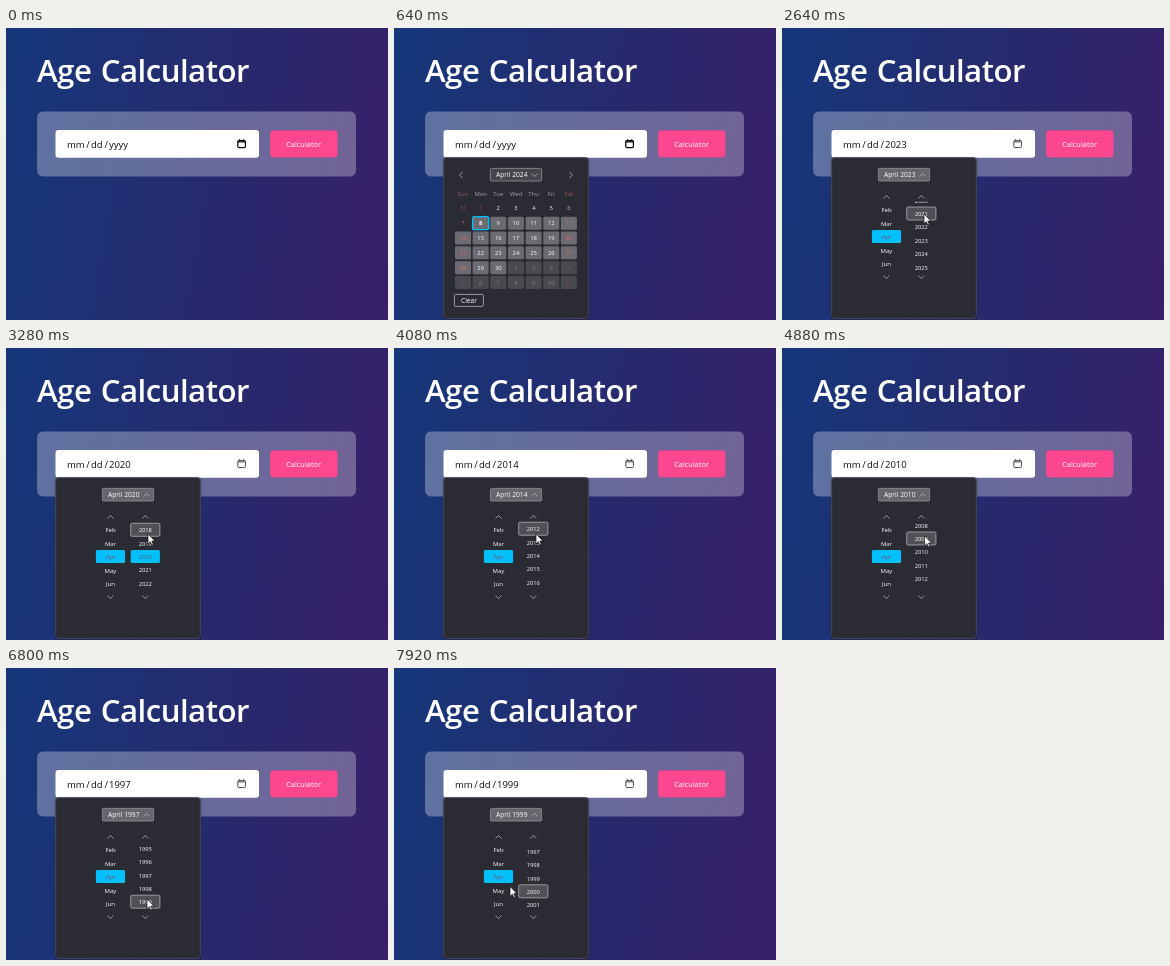
An HTML page that plays this animation: 382x292 px, repeating every 8000 ms.

```html
<!DOCTYPE html>
<html lang="en">
<head>
<meta charset="utf-8">
<title>Age Calculator</title>
<style>
  html, body { margin: 0; width: 100%; height: 100%; overflow: hidden; }
  body { background: linear-gradient(100deg, #15387b, #272a6e 52%, #381f67); }
  svg { display: block; width: 100vw; height: 100vh; }
  text { font-family: "Open Sans", "Noto Sans", sans-serif; white-space: pre; }
</style>
</head>
<body>
<svg id="stage" viewBox="0 0 382 292"></svg>
<script>
const NS = 'http://www.w3.org/2000/svg';
const LOOP = 8000, TICK = 80, ROW = 13.35, MID = 209;
const PANEL = '#2b2b33', CYAN = '#00c0fb', RED = '#e0696e', DIM_RED = '#875059';
const COLS = { month: 104.5, year: 139.3 };
const MEDIUM = { 'font-weight': 500 };

function add(parent, tag, attrs = {}) {
  const el = document.createElementNS(NS, tag);
  for (const k in attrs) el.setAttribute(k, attrs[k]);
  parent.appendChild(el);
  return el;
}
const group = (parent, attrs) => add(parent, 'g', attrs);

function box(parent, x, y, width, height, rx, fill, stroke = 'none', sw = 0.8) {
  return add(parent, 'rect', { x, y, width, height, rx, fill, stroke, 'stroke-width': sw });
}

// y is the vertical middle of the capitals
function label(parent, str, x, y, size, fill = '#fff', anchor = 'middle', extra = {}) {
  const el = add(parent, 'text', {
    x, y: y + size * 0.36, 'font-size': size, fill, 'text-anchor': anchor, ...extra
  });
  el.textContent = str;
  return el;
}

function line(parent, d, stroke = '#b4b4b8', sw = 0.8) {
  return add(parent, 'path', { d, stroke, 'stroke-width': sw, fill: 'none' });
}
const chevron = (parent, x, y, up) =>
  line(parent, `M${x - 3} ${y + (up ? 1.5 : -1.5)}l3 ${up ? -3 : 3}l3 ${up ? 3 : -3}`);

const show = (el, on) => el.setAttribute('visibility', on ? 'inherit' : 'hidden');

const stage = document.getElementById('stage');

// Page
label(stage, 'Age Calculator', 31, 43.2, 31.2, '#fff', 'start',
  { 'font-weight': 600, 'letter-spacing': -0.5, 'word-spacing': 1.6 });
box(stage, 31, 83.5, 319, 65, 6, 'rgba(255,255,255,.3)');
box(stage, 49.5, 102, 203.5, 27.8, 3, '#fff');
box(stage, 264.2, 102.4, 67.2, 26.8, 3, '#ff478f', '#d0488f', 0.6);
label(stage, 'Calculator', 297.6, 116, 7.4);

const ink = '#0c0c0c';
[['mm', 61], ['/', 80.2], ['dd', 85], ['/', 98.6]].forEach(([s, x]) =>
  label(stage, s, x, 116.6, 9.5, ink, 'start', MEDIUM));
const inputYear = label(stage, 'yyyy', 103, 116.6, 9.5, ink, 'start', MEDIUM);

const icon = group(stage, { fill: 'none' });
add(icon, 'rect', { x: 231.8, y: 112.6, width: 7.6, height: 7, rx: 1 });
add(icon, 'path', { d: 'M231.8 113.9h7.6M233.6 111.2v1.4M237.6 111.2v1.4' });

// Popup
const popup = group(stage);
box(popup, 48.5, 129, 147, 163.5, 4, 'rgba(0,0,0,.22)');
box(popup, 49.6, 129.4, 144.8, 161.2, 3, PANEL, '#56565e', 0.7);
const headBox = box(popup, 96.4, 140.4, 51.2, 12.6, 1.2, '#46464d', '#94949a');
const heading = label(popup, '', 102, 146.9, 6.7, '#fff', 'start');

// Day grid
const days = group(popup);
line(days, 'M68.6 144l-3 3l3 3M175.4 144l3 3l-3 3');
chevron(days, 140.7, 147, false);
const colX = c => 69 + c * 17.65;
const weekend = c => c === 0 || c === 6;
['Sun', 'Mon', 'Tue', 'Wed', 'Thu', 'Fri', 'Sat'].forEach((d, c) =>
  label(days, d, colX(c), 165.4, 5.9, weekend(c) ? '#a0565c' : '#a2a2a8'));

for (let i = 0; i < 42; i++) {
  const r = Math.floor(i / 7), c = i % 7;
  const x = colX(c), y = 180.3 + r * 14.85;
  const next = i > 30, today = i === 8;
  const num = i === 0 ? 31 : next ? i - 30 : i;
  if (i > 7) {
    box(days, x - 8, y - 6.5, 16, 13, 1.5, next ? '#494950' : '#6b6b71',
      today ? CYAN : 'none', 1.4);
  }
  let fill = '#fff';
  if (next) fill = weekend(c) ? '#75555b' : '#85858b';
  else if (i < 2) fill = DIM_RED;
  else if (i === 6) fill = '#d4b4b6';
  else if (i === 7) fill = '#b06a6e';
  else if (i === 13) fill = '#a8757a';
  else if (weekend(c)) fill = RED;
  label(days, num, x, y, 5.9, fill, 'middle', today ? { 'font-weight': 700 } : MEDIUM);
}
box(days, 60.4, 266.4, 29, 12, 1, PANEL, '#b5b5b9');
label(days, 'Clear', 75, 272.4, 6.6);

// Month and year lists
const picker = group(popup);
chevron(picker, 140.7, 147, true);
for (const x of Object.values(COLS)) {
  chevron(picker, x, 169, true);
  chevron(picker, x, 249, false);
}
const CELL_TOP = -7;
const cell = (x, fill, stroke) =>
  box(picker, x - 14.6, MID + CELL_TOP, 29.2, 13, 1.5, fill, stroke);
cell(COLS.month, CYAN);
['Feb', 'Mar', 'Apr', 'May', 'Jun'].forEach((m, i) =>
  label(picker, m, COLS.month, MID + (i - 2) * ROW, 6, i === 2 ? '#84506c' : '#fff',
    'middle', MEDIUM));
const picked = cell(COLS.year, CYAN);
const hover = cell(COLS.year, '#505057', '#b0b0b4');
const clip = add(add(stage, 'defs'), 'clipPath', { id: 'list' });
box(clip, 120, 173.5, 40, 68.5, 0, '#000');
const list = group(picker, { 'clip-path': 'url(#list)' });
const years = Array.from({ length: 7 }, () =>
  label(list, '', COLS.year, 0, 5.8, '#fff', 'middle', MEDIUM));

const cursor = add(stage, 'path', {
  d: 'M0 0V17L4 13.2L6.6 19L9.2 17.9L6.7 12.2H12Z',
  fill: '#fff', stroke: '#111', 'stroke-width': 1.2
});

// Timeline
const OPEN = 560, POINTER = 720, PICK = 2160, FIRST = 2560;
const path = [ // time, x, y
  [720, 236, 118], [1280, 160, 160], [1520, 160, 160], [1600, 152, 157],
  [1760, 152, 157], [1920, 143.5, 153.5], [2160, 143.5, 153.5], [2400, 142, 186],
  [4480, 142, 186], [4640, 142.6, 188], [5520, 142.6, 188], [5680, 142, 187.5],
  [5920, 142, 187.5], [6080, 141, 231], [7040, 141, 231], [7120, 140, 222],
  [7800, 140, 222], [7920, 116, 218.5]
];
const scrolls = [ // start, duration, year
  [2560, 200, 2022], [2760, 200, 2020], [3360, 200, 2018], [3560, 200, 2016],
  [3920, 200, 2014], [4120, 200, 2012], [4740, 240, 2010], [5520, 280, 1994],
  [6100, 220, 1996], [6720, 240, 1998], [7760, 240, 1999]
];

function pointerAt(t) {
  const i = path.findIndex(p => p[0] > t);
  if (i === 0) return path[0].slice(1);
  if (i < 0) return path[path.length - 1].slice(1);
  const [a, b] = [path[i - 1], path[i]];
  const k = (t - a[0]) / (b[0] - a[0]);
  return [1, 2].map(n => a[n] + (b[n] - a[n]) * k);
}

function yearAt(t) {
  let pos = 2024;
  for (const [start, len, to] of scrolls) {
    const k = Math.min(1, Math.max(0, (t - start) / len));
    pos += (to - pos) * (1 - (1 - k) ** 2);
  }
  return pos;
}

function drawList(t, pos) {
  const near = Math.round(pos);
  const resting = Math.abs(pos - near) < 0.001;
  const rowY = y => MID + (y - pos) * ROW;
  years.forEach((el, i) => {
    const y = near + i - 3;
    el.textContent = y;
    el.setAttribute('y', rowY(y) + 2.1);
    el.setAttribute('fill', resting && y === near ? '#4a5a78' : '#fff');
  });
  show(picked, resting);

  // the hover outline trails the pointer slightly
  const [px, py] = pointerAt(t - 100);
  const over = Math.round(pos + (py - MID) / ROW);
  show(hover, Math.abs(px - COLS.year) < 15 && py > 174 && py < 243);
  hover.setAttribute('y', rowY(over) + CELL_TOP);
}

function draw(t) {
  const pos = yearAt(t), year = Math.round(pos);
  const picking = t >= PICK;
  show(popup, t >= OPEN);
  show(days, !picking);
  show(picker, picking);
  headBox.setAttribute('fill', picking ? '#66666c' : '#46464d');
  heading.textContent = 'April ' + year;
  inputYear.textContent = t >= FIRST && year < 2024 ? year : 'yyyy';
  icon.setAttribute('stroke', t < POINTER ? '#000' : '#4a4a4a');
  icon.setAttribute('stroke-width', t < POINTER ? 1.2 : 1);
  if (picking) drawList(t, pos);
  else { show(picked, false); show(hover, false); }
  const [x, y] = pointerAt(t);
  show(cursor, t >= POINTER);
  cursor.setAttribute('transform', `translate(${x} ${y}) scale(.58)`);
}

const began = performance.now();
function loop() {
  const t = (performance.now() - began) % LOOP;
  draw(Math.floor(t / TICK) * TICK);
  requestAnimationFrame(loop);
}
loop();
</script>
</body>
</html>
```
